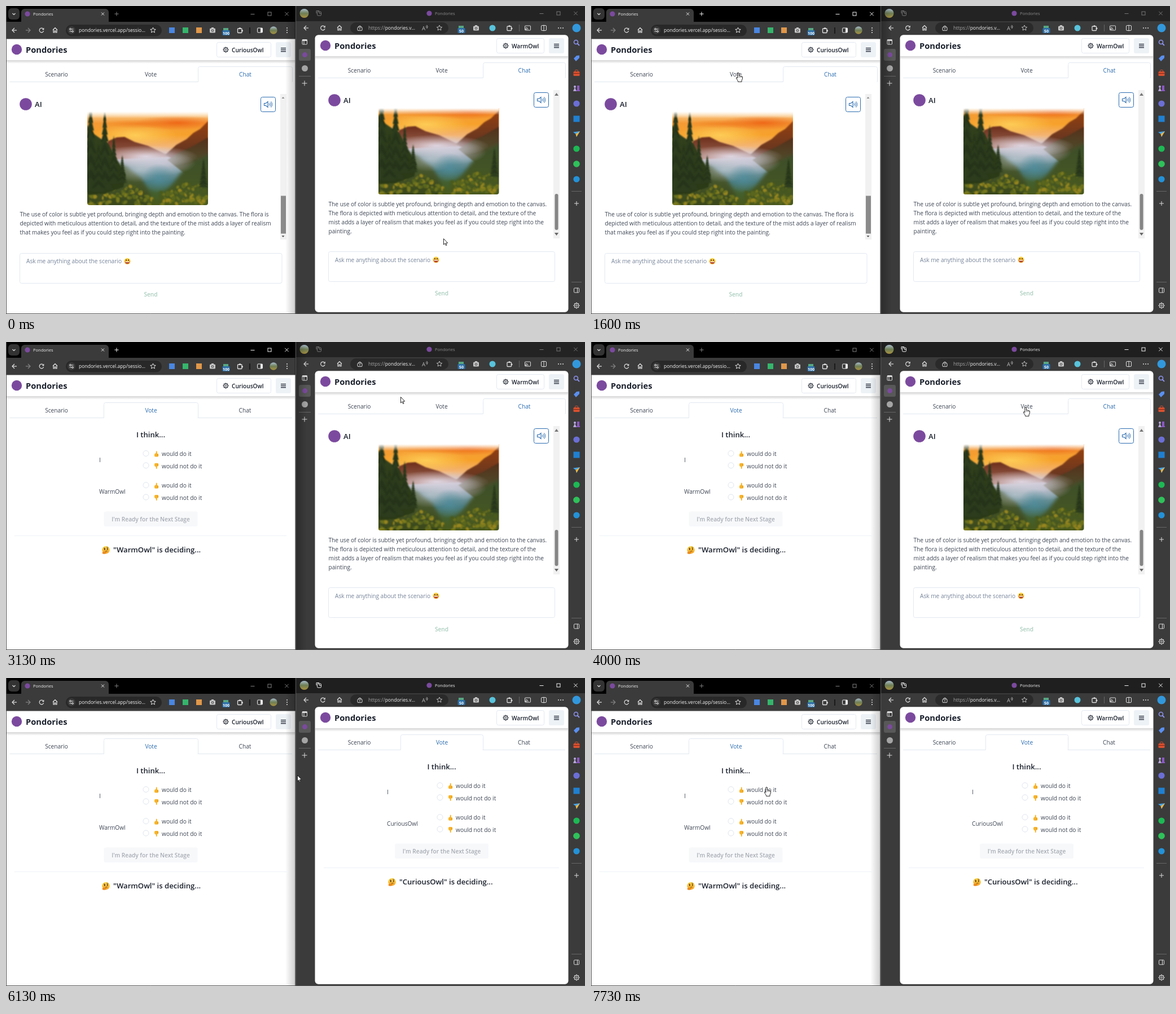
Animation, 1026 px wide and 546 px high, one loop 8 s. Source, as an HTML page with a canvas:

```html
<!DOCTYPE html>
<html lang="en">
<head>
<meta charset="utf-8">
<title>Two browsers</title>
<style>
html, body { margin: 0; width: 100%; height: 100%; overflow: hidden; background: #000; }
canvas { display: block; width: 1026px; height: 546px; }
</style>
</head>
<body>
<canvas id="stage"></canvas>
<script>
const W = 1026, H = 546, LOOP = 8000, STEP = 200 / 3;
const FONT = '"Open Sans", "Noto Sans", sans-serif';
const INK = '#1a202c', BODY = '#3d4553', EDGE = '#e2e8f0', BLUE = '#2b6cb0', BALL = '#7b4a9e';
const APP = 'Pondories';
const stage = document.getElementById('stage');
const dpr = window.devicePixelRatio || 1;
stage.width = W * dpr;
stage.height = H * dpr;
let c = stage.getContext('2d');
c.scale(dpr, dpr);

// ---- drawing helpers ----
function rect(x, y, w, h, col) { c.fillStyle = col; c.fillRect(x, y, w, h); }
function paint(fill, stroke, lw = 1) {
  if (fill) { c.fillStyle = fill; c.fill(); }
  if (stroke) { c.strokeStyle = stroke; c.lineWidth = lw; c.stroke(); }
}
function box(x, y, w, h, r, fill, stroke, lw) {
  c.beginPath(); c.roundRect(x, y, w, h, r); paint(fill, stroke, lw);
}
function dot(x, y, r, fill, stroke, lw) {
  c.beginPath(); c.arc(x, y, r, 0, 7); paint(fill, stroke, lw);
}
function oval(x, y, rx, ry, fill, turn = 0) {
  c.beginPath(); c.ellipse(x, y, rx, ry, turn, 0, 7); paint(fill);
}
function arc(x, y, r, a, b, col, lw = 1) {
  c.beginPath(); c.arc(x, y, r, a, b); paint(null, col, lw);
}
function trace(p) {
  c.beginPath();
  for (let i = 0; i < p.length; i += 2) c.lineTo(p[i], p[i + 1]);
}
function line(col, lw, ...p) { trace(p); paint(null, col, lw); }
function poly(fill, ...p) { trace(p); c.closePath(); paint(fill); }
function text(s, x, y, size, col, weight = 400, align = 'left') {
  c.font = `${weight} ${size}px ${FONT}`;
  c.textAlign = align;
  c.fillStyle = col;
  c.fillText(s, x, y);
}
function at(x, y, draw) { c.save(); c.translate(x, y); draw(); c.restore(); }
function fade(x0, y0, x1, y1, ...stops) {
  const g = c.createLinearGradient(x0, y0, x1, y1);
  stops.forEach((s, i) => g.addColorStop(i / (stops.length - 1), s));
  return g;
}
function glow(x, y, rx, ry, rgb, a) {
  at(x, y, () => {
    c.scale(rx, ry);
    const g = c.createRadialGradient(0, 0, 0, 0, 0, 1);
    g.addColorStop(0, `rgba(${rgb},${a})`);
    g.addColorStop(1, `rgba(${rgb},0)`);
    dot(0, 0, 1, g);
  });
}

// ---- icons ----
function plus(x, y, r, col) { line(col, 1, x - r, y, x + r, y); line(col, 1, x, y - r, x, y + r); }
function cross(x, y, r, col) { line(col, 1, x - r, y - r, x + r, y + r); line(col, 1, x + r, y - r, x - r, y + r); }
function controls(x, y, col) {
  line(col, 1, x - 3.5, y + .5, x + 3.5, y + .5);
  c.strokeStyle = col; c.strokeRect(x + 27, y - 3, 6, 6);
  cross(x + 60.5, y, 3.2, col);
}
function arrow(x, y, dir, col) {
  line(col, 1.2, x - 4 * dir, y, x + 4 * dir, y);
  line(col, 1.2, x, y - 4, x + 4 * dir, y, x, y + 4);
}
function reload(x, y, col) {
  arc(x, y, 3.8, .3, 5.4, col, 1.2);
  poly(col, x + 4.3, y - 4.5, x + 4.3, y - .8, x + .8, y - .8);
}
function home(x, y, col) {
  line(col, 1.2, x - 4, y - .5, x, y - 4.3, x + 4, y - .5);
  line(col, 1.2, x - 3, y - 1, x - 3, y + 4, x - 1, y + 4, x - 1, y + 1, x + 1, y + 1, x + 1, y + 4, x + 3, y + 4, x + 3, y - 1);
}
function star(x, y, col) {
  trace(Array.from({ length: 20 }, (_, i) => {
    const a = (i >> 1) * Math.PI / 5, r = i >> 1 & 1 ? 2.3 : 5;
    return i & 1 ? y - r * Math.cos(a) : x + r * Math.sin(a);
  }));
  c.closePath(); paint(null, col, 1);
}
function camera(x, y) {
  box(x - 5, y - 3.5, 10, 8, 1.5, '#c6c6c6'); rect(x - 2, y - 5, 4, 2, '#c6c6c6');
  dot(x, y + .5, 2.3, '#555'); dot(x, y + .5, 1.1, '#ddd');
}
function puzzle(x, y, col) {
  box(x - 4, y - 3, 7.5, 7.5, 1, null, col, 1.3);
  dot(x, y - 3.5, 1.5, col); dot(x + 4, y + .7, 1.5, col);
}
function panel(x, y, col) { box(x - 4.5, y - 4, 9, 8, 1.2, null, col); rect(x + 1, y - 4, 3.5, 8, col); }
function dots(x, y, dx, dy, col) { for (let i = -1; i < 2; i++) dot(x + i * dx, y + i * dy, 1, col); }
function badge(x, y, s) {
  rect(x - 5, y - 6, 9, 5, '#57a783');
  box(x - 6.5, y - 2, 13, 9, 1.5, '#2c6fa8');
  text(s, x, y + 5.5, 7, '#fff', 700, 'center');
}
function gear(x, y, r, col) {
  dot(x, y, r * .72, null, col, 1.1);
  dot(x, y, r * .28, null, col, .9);
  for (let i = 0; i < 8; i++) {
    const a = i * Math.PI / 4, u = Math.cos(a), v = Math.sin(a);
    line(col, 1.4, x + u * r * .75, y + v * r * .75, x + u * r, y + v * r);
  }
}
function portrait(x, y, r) { dot(x, y, r, fade(x, y - r, x, y + r, '#a8bccb', '#6f7f55', '#a8923f')); }
function speaker(x, y) {
  trace([x - 7, y - 2, x - 4, y - 2, x - .5, y - 5, x - .5, y + 5, x - 4, y + 2, x - 7, y + 2]);
  c.closePath(); paint(null, BLUE, 1.1);
  [2.8, 5.2, 7.6].forEach(r => arc(x - .5, y, r, -.75, .75, BLUE, 1));
}
function grin(x, y) {
  dot(x, y, 5.5, fade(x, y - 5, x, y + 5, '#ffd84a', '#f2a11c'));
  oval(x - 2, y - 1.8, .9, 1.2, '#4a2d16'); oval(x + 2, y - 1.8, .9, 1.2, '#4a2d16');
  c.beginPath(); c.arc(x, y + .6, 3.7, 0, Math.PI); paint('#a8342a');
  rect(x - 3.2, y + .6, 6.4, 1.3, '#fff');
}
function ponder(x, y) {
  dot(x, y, 6.8, fade(x, y - 6, x, y + 6, '#ffd951', '#f3a524'));
  oval(x - 2.2, y - 1, 1, 1.4, '#4a2d16'); oval(x + 2.7, y - 1.5, 1, 1.4, '#4a2d16');
  line('#6b421d', 1, x - 4, y - 3.2, x - 1, y - 3.2);
  line('#6b421d', 1, x + 1, y - 4.7, x + 4.3, y - 4.2);
  line('#6b421d', 1, x - 1.5, y + 2.8, x + 2.8, y + 1.8);
  oval(x - 3, y + 5.2, 3.4, 2, '#e98b1f');
  line('#e98b1f', 1.8, x - 4, y + 4.5, x + .8, y + 3.6);
}
function thumb(x, y, dir) {
  at(x, y, () => {
    c.scale(1, dir);
    box(-3, -.8, 7.2, 5.8, 2, '#f7b52c');
    poly('#f7b52c', -3, 1, -.4, -2, 0, -5.3, 1.6, -4.8, 2, -.5);
    [1, 2.8].forEach(v => line('#d98b1a', .6, 1.2, v, 4, v));
  });
}

// ---- misty valley ----
const VW = 214, VH = 166;
const valley = document.createElement('canvas');
function makeValley() {
  valley.width = VW * dpr; valley.height = VH * dpr;
  const main = c;
  c = valley.getContext('2d');
  c.scale(dpr, dpr);
  let seed = 7;
  const rnd = () => (seed = seed * 16807 % 2147483647) / 2147483647;
  rect(0, 0, VW, VH, fade(0, 0, 0, VH, '#fbd9a4', '#f49a35', '#f7a22c', '#f3b678', '#b9b3be', '#7d9da6', '#4a7a7c', '#44602f', '#4a5a1c'));
  glow(85, 42, 75, 20, '255,214,96', .8);
  glow(160, 20, 75, 13, '236,88,14', .75);
  glow(90, 22, 60, 8, '240,120,30', .6);
  c.filter = 'blur(1px)';
  poly(fade(0, 44, 0, 84, '#6b2c18', '#a06a58'), 24, 70, 38, 52, 52, 46, 66, 45, 84, 54, 108, 61, 135, 74, 150, 80, 24, 86);
  poly(fade(0, 16, 0, 80, '#96400f', '#5f3524'), 138, 77, 158, 59, 176, 49, 188, 38, 200, 31, 214, 17, 214, 100, 160, 88);
  poly(fade(0, 46, 0, 110, '#54301a', '#4d5a35'), 142, 86, 162, 73, 186, 62, 214, 46, 214, 125, 175, 112);
  c.filter = 'blur(3px)';
  poly(fade(0, 78, 0, VH, '#56653f', '#39471a'), 0, 76, 36, 82, 70, 98, 96, 118, 112, 146, 110, 180, -9, 180);
  poly(fade(0, 75, 0, VH, '#3c4e2a', '#4a5a20'), 224, 72, 190, 88, 168, 106, 150, 130, 128, 150, 124, 180, 224, 180);
  c.filter = 'none';
  glow(104, 80, 92, 20, '232,222,234', .95);
  glow(130, 92, 62, 22, '204,204,218', .75);
  glow(92, 102, 48, 24, '196,204,212', .6);
  glow(126, 118, 28, 26, '80,142,158', .75);
  c.filter = 'blur(1px)';
  const leaf = ['#7a7a1e', '#978620', '#5a661e', '#69701e', '#4b5a1c'];
  for (let i = 0; i < 170; i++) {
    const u = rnd() * VW, v = 136 + rnd() * 34 + 9 * Math.cos(u / 19);
    oval(u, v, 2 + rnd() * 3, 1.5 + rnd() * 2.5, leaf[i % 5], rnd() * 3);
  }
  poly(fade(0, 20, 0, 150, '#35431f', '#2a3916'), 0, 24, 12, 40, 38, 58, 52, 84, 68, 112, 64, 134, 30, 146, 0, 148);
  [[6, -8, 140, 19], [31, 3, 138, 17], [47, 48, 128, 12], [20, 58, 142, 14], [62, 80, 126, 9], [206, 86, 134, 9]]
    .forEach(([u, top, foot, half]) => {
      const n = 11, h = (foot - top) / n;
      for (let i = 0; i < n; i++) {
        const w = half * (i + 1.6) / (n + .6), y = top + i * h;
        poly(i % 2 ? '#26341a' : '#2c3c1d', u, y - h * .8, u + w, y + h * 1.1, u - w, y + h * 1.1);
      }
    });
  c.filter = 'none';
  c = main;
}
makeValley();

// ---- pages ----
const left = {
  x: 0, r: 0, cx: 256.5, dy: 0, tabX: 6, tabW: 167, m: 24.5, end: 489, area: 438.5, voice: 161.5,
  me: 'CuriousOwl', other: 'WarmOwl', btn: 97, who: 165, radio: 248, think: 177,
  imgH: 166, foot: 353, base: 373, hint: 456, send: 515, rule: [15, 497],
  lines: ['The use of color is subtle yet profound, bringing depth and emotion to the canvas. The flora is',
    'depicted with meticulous attention to detail, and the texture of the mist adds a layer of realism',
    'that makes you feel as if you could step right into the painting.']
};
const right = {
  x: 547, r: 484, cx: 772, dy: -7, tabX: 553, tabW: 146, m: 571.5, end: 972.5, area: 442.5, voice: 160.5,
  me: 'WarmOwl', other: 'CuriousOwl', btn: 85, who: 675, radio: 769, think: 684,
  imgH: 153, foot: 341, base: 361.5, hint: 460.5, send: 519.5, rule: [563, 980],
  lines: ['The use of color is subtle yet profound, bringing depth and emotion to the canvas.',
    'The flora is depicted with meticulous attention to detail, and the texture of the',
    'mist adds a layer of realism that makes you feel as if you could step right into the',
    'painting.']
};

function chat(p) {
  const x = p.cx - 112.5, sx = Math.round(p.end - 38) + .5;
  dot(p.m + 10.5, 174, 10.8, BALL);
  text('AI', p.m + 26.5, 179, 13.1, INK, 600);
  box(sx, p.voice, 26, 26, 3, '#fff', BLUE);
  speaker(sx + 13, p.voice + 13);
  c.save();
  c.beginPath(); c.roundRect(x, p.foot - p.imgH, VW, p.imgH, [0, 0, 4, 4]); c.clip();
  c.drawImage(valley, x, p.foot - VH, VW, VH);
  rect(x, p.foot - p.imgH, VW, 12, fade(0, p.foot - p.imgH, 0, p.foot - p.imgH + 12, '#fff', 'rgba(255,255,255,0)'));
  c.restore();
  p.lines.forEach((s, i) => text(s, p.m, p.base + i * 16, 10.15, BODY));
  box(p.m, p.area, p.end - p.m, 53, 3, '#fff', EDGE);
  text('Ask me anything about the scenario', p.m + 11.5, p.hint, 10.15, '#76849a');
  grin(p.m + 190.5, p.hint - 3.7);
  text('Send', p.cx, p.send, 10.15, '#a9cdbd', 600, 'center');
  if (p === left) {
    rect(486, 156, 11, 258, '#f1f1f1');
    rect(487, 336.5, 9, 67, '#8a8a8a');
    poly('#8a8a8a', 488.5, 164, 493.5, 164, 491, 161);
    poly('#555', 488.5, 407, 493.5, 407, 491, 410);
  } else {
    rect(970, 156, 11, 263, '#f1f1f1');
    box(972.5, 340, 6, 64, 3, '#858585');
    poly('#777', 972, 166, 979, 166, 975.5, 161);
    poly('#666', 972, 409, 979, 409, 975.5, 414);
  }
}

function vote(p) {
  text('I think...', p.cx, 169, 13.1, INK, 600, 'center');
  ['I', p.other].forEach((who, i) => {
    const y = 197.5 + i * 56.2;
    text(who, p.who, y + 15.5, 10.15, BODY);
    ['would do it', 'would not do it'].forEach((s, j) => {
      const v = y + j * 21.3;
      dot(p.radio, v, 5, '#fff', '#dfe5ed');
      thumb(p.radio + 18, v + 1, j ? -1 : 1);
      text(s, p.radio + 28, v + 4.7, 10.15, BODY);
    });
  });
  box(p.cx - 83, 300.5, 166, 26.5, 3, '#f7f8fa');
  text("I'm Ready for the Next Stage", p.cx, 318, 10.15, '#a6abb3', 600, 'center');
  line('#edf1f6', 1, p.rule[0], 343.5, p.rule[1], 343.5);
  ponder(p.think, 368.5);
  text(`"${p.other}" is deciding...`, p.think + 13, 373.3, 13.1, INK, 600);
}

function activeTab(p, i, alpha) {
  const x = p.tabX + i * p.tabW + .5;
  c.globalAlpha = alpha;
  rect(x, 108, p.tabW - 1, 28, '#fff');
  c.beginPath();
  c.moveTo(x, 134.5); c.lineTo(x, 110.5); c.quadraticCurveTo(x, 107.5, x + 3, 107.5);
  c.lineTo(x + p.tabW - 3, 107.5); c.quadraticCurveTo(x + p.tabW, 107.5, x + p.tabW, 110.5); c.lineTo(x + p.tabW, 134.5);
  paint(null, EDGE);
  text(['Scenario', 'Vote', 'Chat'][i], x + p.tabW / 2, 125, 10.15, BLUE, 400, 'center');
  c.globalAlpha = 1;
}

function page(p, t, swap) {
  const k = Math.min(1, Math.max(0, (t - swap) / 200));
  at(0, p.dy, () => {
    const x0 = p === left ? 1 : 548, x1 = p === left ? 512 : 996;
    rect(x0, 96, x1 - x0, 6, fade(0, 96, 0, 102, 'rgba(0,0,0,.17)', 'rgba(0,0,0,0)'));
    dot(p.x + 19, 77, 9.2, BALL);
    text(APP, p.x + 35, 83, 14.7, INK, 700);
    const bx = 470 + p.r - p.btn;
    box(bx + .5, 64.5, p.btn - 1, 26, 3, '#fff', EDGE);
    gear(bx + 16.5, 77.5, 5, INK);
    text(p.me, bx + 27, 81.7, 10.15, INK, 600);
    box(478 + p.r, 64, 27, 27, 3, '#edf2f7');
    for (let i = -1; i < 2; i++) rect(487 + p.r, 77 + i * 3, 9, 1.3, INK);
    line(EDGE, 1, p.tabX, 134.5, p.tabX + p.tabW * 3, 134.5);
    ['Scenario', 'Vote', 'Chat'].forEach((s, i) =>
      text(s, p.tabX + p.tabW * (i + .5), 125, 10.15, BODY, 400, 'center'));
    if (k < 1) activeTab(p, 2, 1 - k);
    if (k > 0) activeTab(p, 1, k);
    (t < swap ? chat : vote)(p);
  });
}

// ---- browser frames ----
function leftChrome(on) {
  const ui = on ? '#f2f2f2' : '#808080', ic = '#e4e4e4';
  rect(0, 0, 513, H, '#000');
  box(4, 4, 20, 20, 6, '#333');
  line(ic, 1.2, 11.5, 13, 14, 15.5, 16.5, 13);
  box(27, 5, 155, 30, 6, '#3b3b3b');
  rect(1, 28, 511.5, 31, '#3b3b3b');
  dot(38, 14, 4.6, BALL);
  text(APP, 48, 17.4, 7.5, '#f2f2f2');
  cross(171.5, 14, 2.5, '#e8e8e8');
  plus(196, 14, 3.6, ui);
  controls(437, 14, ui);
  arrow(15, 43, -1, ic); arrow(39, 43, 1, '#858585'); reload(63, 43, ic); home(87, 43, ic);
  box(106, 33, 170, 20.5, 10, '#282828');
  dot(116, 43, 7, '#3b3b3b');
  [-2, 2].forEach(v => { line(ic, 1, 112.5, 43 + v, 119.5, 43 + v); dot(116 + v, 43 + v, 1.4, '#3b3b3b', ic); });
  text('pondories.vercel.app/sessio…', 129, 46.4, 8.55, '#f4f4f4');
  star(260.5, 43, ic);
  rect(289, 38, 10, 10, '#4a86e0'); rect(313, 38, 10, 10, '#35b56c'); rect(337, 38, 10, 10, '#e0984a');
  camera(366, 43); badge(390, 45, '100'); puzzle(414.5, 43, ic);
  line('#111', 1.5, 432, 38, 432, 49);
  panel(450, 43, '#f0f0f0'); portrait(474, 43, 6.7); dots(498, 43, 0, 4, ic);
  rect(.5, 58.5, 512, 487, '#fff');
}

function rightChrome(on) {
  const ui = on ? '#f2f2f2' : '#777', ic = '#dcdcdc';
  rect(513, 0, 513, H, '#3b3b3b');
  rect(513, 0, 513, 27, on ? '#1f1f1f' : '#232323');
  portrait(528.5, 13, 8);
  box(551.5, 10, 7, 7, 1.5, null, ui); line(ui, 1, 550, 13, 550, 8.5, 555, 8.5);
  line(ui, 1, 555, 10, 555, 13, 558, 13);
  dot(750, 13, 4.6, BALL);
  text(APP, 760, 16.3, 7.5, on ? '#f2f2f2' : '#8b8b8b');
  controls(949, 13, ui);
  arrow(532, 39, -1, ic); reload(561.5, 39, ic); home(591, 39, ic);
  box(610, 29, 174, 20, 10, '#2a2a2a');
  box(623, 37.5, 8, 6, 1, null, ic); arc(627, 37.5, 2.3, Math.PI, 0, ic); dot(627, 40.5, 1, ic);
  text('https://', 642, 42.3, 8.7, '#a5a5a5');
  text('pondories.v...', 642 + c.measureText('https://').width, 42.3, 8.5, '#f2f2f2');
  text('A', 737, 42.5, 9.5, '#bbb'); arc(743, 37, 2, -.9, .9, '#bbb'); arc(743, 37, 4, -.9, .9, '#bbb');
  star(768, 39, '#bbb');
  badge(807, 41, '50'); camera(833, 39); dot(862, 39, 5.5, '#58c4dc'); puzzle(892, 39, ic);
  line('#666', 1, 909.5, 33, 909.5, 45);
  box(919.5, 35, 10, 8, 1, null, ic); dot(921.5, 41, 1.3, ic); arc(920, 42.5, 5, -1.4, -.1, ic);
  box(948.5, 34.5, 9, 9, 1.5, null, ic); line(ic, 1, 953, 33.5, 953, 44.5);
  dots(983, 39, 4, 0, ic);

  box(525, 59.5, 8.5, 8.5, 1, null, ic); rect(525, 59.5, 8.5, 2.5, ic); line(ic, 1, 528, 60, 528, 68);
  box(519, 76, 21, 21, 3, '#585858'); dot(529.5, 86.5, 4.4, BALL);
  dot(529.5, 110.5, 5.5, '#a5a5a5');
  line('#666', 1, 519, 124.5, 540, 124.5);
  plus(529, 137, 4.5, ic);

  const x = 1011;
  dot(x, 39, 7.5, '#3298dc');
  dot(x - 1, 64, 3.5, null, '#8d93ee', 1.6); line('#8d93ee', 1.8, x + 1.5, 66.5, x + 5, 70);
  poly('#5a8ff0', x - 5, 93, x, 88, x + 5, 87.5, x + 5, 92, x - 1, 98);
  box(x - 5.5, 116, 11, 8, 1.5, '#d9502f'); box(x - 2.5, 113.5, 5, 4, 1, null, '#d9502f'); rect(x - 5.5, 119, 11, 1, '#7d2417');
  dot(x - 3, 143, 2, '#b8a9da'); poly('#b8a9da', x - 3, 144, x, 151, x - 6, 151);
  rect(x + 1, 141, 4, 8, '#8c58c4'); rect(x, 149, 6, 2, '#8c58c4');
  dot(x, 173, 5.6, '#6b6fd6');
  rect(x - 5.5, 194.5, 11, 11, '#2080d0');
  poly('#45a5ec', x - 6, 223.5, x + 6, 222, x, 232, x - 1.5, 227); poly('#f0b53c', x - 1.5, 227, x + 6, 222, x, 232);
  dot(x, 253, 5.6, '#1db954'); dot(x, 280, 5.8, '#2fc25a'); dot(x, 307, 5.6, '#2492d8');
  line('#666', 1, 1002, 328.5, 1020, 328.5); plus(x, 350, 4, ic);
  line('#666', 1, 1002, 489.5, 1020, 489.5);
  box(x - 4.5, 500, 9, 8, 1.2, null, ic); line(ic, 1, x + 1.5, 500, x + 1.5, 508);
  gear(x, 531, 5.4, ic);
  box(547.5, 51.3, 449, 491.5, 6, '#fff');
  line('#5c5c5c', 1, 513.5, 0, 513.5, H);
  line('#555', 1, 513, 545.5, W, 545.5);
}

// ---- pointer: time, x, y ----
const path = [
  [0, 775, 412], [67, 768, 406], [200, 668, 352], [400, 430, 248], [600, 312, 196], [733, 300, 178], [867, 318, 167],
  [870, 318, 167], [1000, 298, 152], [1133, 270, 126], [1267, 261, 118],
  [2533, 261, 118], [2600, 306, 106], [2867, 510, 85], [3133, 699, 97], [3267, 738, 108], [3400, 752, 112],
  [3533, 762, 114], [3667, 770, 115],
  [5600, 770, 115], [5733, 742, 125], [5933, 622, 158], [6133, 516, 172], [6333, 434, 180],
  [6733, 434, 180], [6867, 425, 183], [7133, 376, 189], [7400, 324, 193], [7600, 310, 192], [7733, 311, 193], [LOOP, 311, 193]
];
function pointer(t) {
  const i = Math.max(1, path.findIndex(p => p[0] >= t));
  const [a, x, y] = path[i - 1], [b, u, v] = path[i], k = (t - a) / (b - a);
  const px = Math.round(x + (u - x) * k), py = Math.round(y + (v - y) * k);
  const over = (l, r, top, foot) => px > l && px < r && py > top && py < foot;
  const hand = over(173, 340, 107, 134) || over(699, 845, 99, 127) || over(242, 331, 191, 206);
  at(px, py, () => {
    trace(hand
      ? [-1.2, 1, 0, .4, 1.3, 1, 1.3, 6, 3, 5.5, 3.7, 6.4, 5.4, 6.2, 6, 7, 7.4, 7.3, 7.4, 11, 6, 14, 6, 16.4,
        -.5, 16.4, -.8, 14.5, -3.6, 10, -3.2, 8.7, -2, 9, -1.2, 10]
      : [.5, .5, .5, 11, 2.9, 8.8, 4.5, 12.5, 6, 11.9, 4.5, 8.2, 7.7, 8.1]);
    c.closePath();
    c.lineJoin = 'round';
    paint('#fff', '#111', .9);
    c.lineJoin = 'miter';
    if (hand) [1.4, 3.4, 5.4].forEach(n => line('#333', .6, n, 6.5, n, 9));
  });
}

function draw(t) {
  const leftOn = t >= 1600 && t < 4000, rightOn = t >= 4000;
  leftChrome(leftOn);
  page(left, t, 1660);
  rightChrome(rightOn);
  page(right, t, 4060);
  if (leftOn) rect(514, 0, 19, H, fade(514, 0, 533, 0, 'rgba(0,0,0,.25)', 'rgba(0,0,0,0)'));
  else rect(495, 0, 18, H, fade(495, 0, 513, 0, 'rgba(0,0,0,0)', 'rgba(0,0,0,.2)'));
  line('#555', 1, .5, 0, .5, H);
  line('#555', 1, 0, 545.5, 513, 545.5);
  pointer(t);
}

const start = performance.now();
function tick() {
  const t = (performance.now() - start) % LOOP;
  draw(Math.min(LOOP, Math.floor((t + 4) / STEP) * STEP));
  requestAnimationFrame(tick);
}
tick();
</script>
</body>
</html>
```
